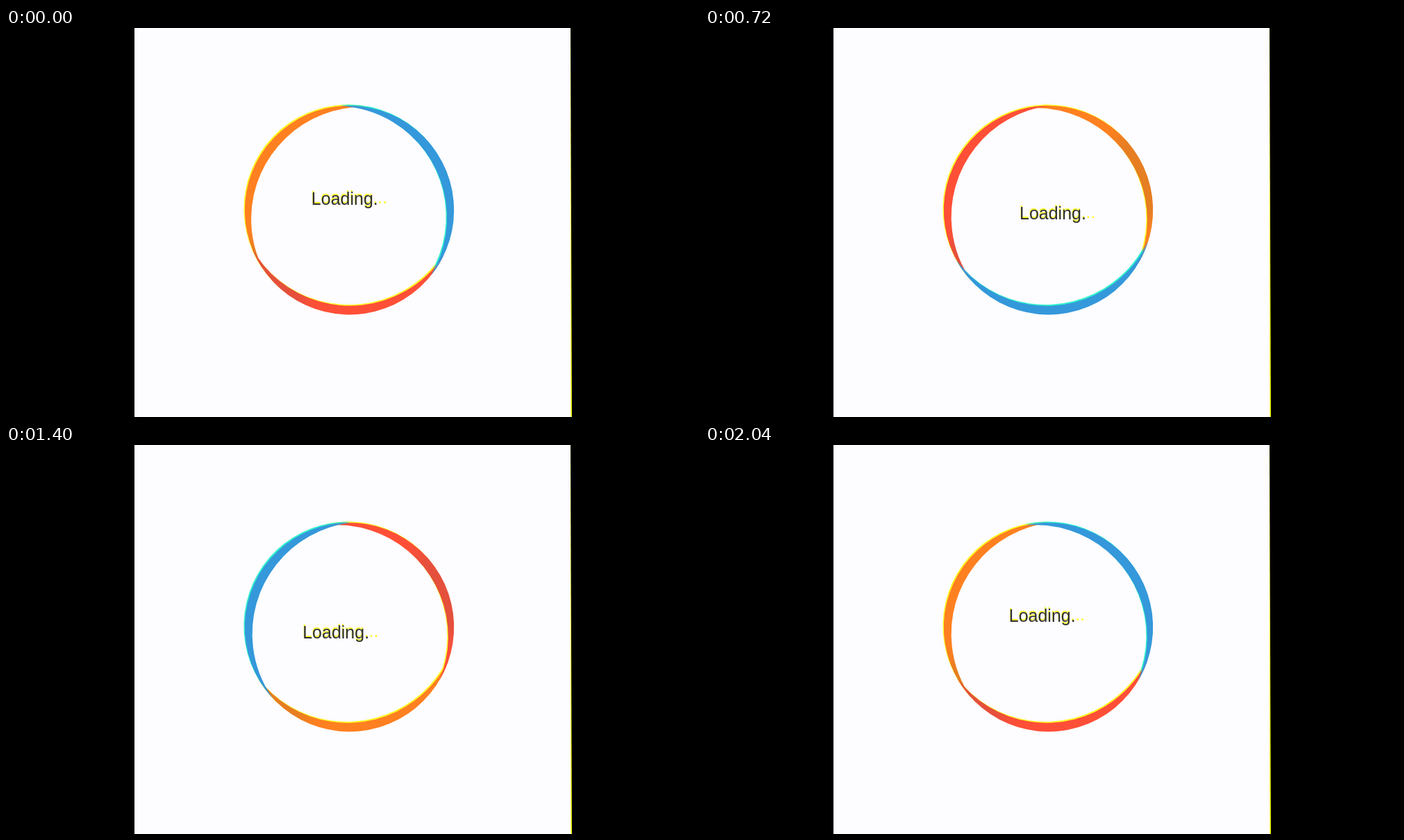
An HTML page with a canvas for the animation above (2.12 s loop, 998 px wide and 561 px high).

```html
<!DOCTYPE html>
<html>
<head>
<meta charset="utf-8">
<style>
html, body { margin: 0; width: 100%; height: 100%; overflow: hidden; background: #000; }
canvas { display: block; }
</style>
</head>
<body>
<canvas id="stage" width="998" height="561"></canvas>
<script>
const c = document.getElementById('stage').getContext('2d');
const CX = 494.5, CY = 262.7, R = 150.7;   // ring
const IN_R = 161.4, SHIFT = 23.6;          // inner edge of a crescent: larger circle, moved back
const RAD = Math.PI / 180;
const PAPER = '#fdfcfe', YELLOW = '#ffff28';

// Half angles at which the outer and inner circles meet
const meetX = (IN_R ** 2 - R ** 2 - SHIFT ** 2) / (2 * SHIFT);
const outerHalf = Math.acos(meetX / R);
const innerHalf = Math.acos((meetX + SHIFT) / IN_R);

// Warm colours are duller at the right and at the lower left of the ring
function shaded(bright, dull) {
  const g = c.createConicGradient(-Math.PI / 2, CX, CY);
  [[0, bright], [.1, bright], [.14, dull], [.25, dull], [.29, bright],
   [.55, bright], [.59, dull], [.68, dull], [.72, bright], [1, bright]]
    .forEach(([at, color]) => g.addColorStop(at, color));
  return g;
}

const parts = [
  { fill: shaded('#ff8020', '#e67e22'), fringe: YELLOW, at: 300 },
  { fill: shaded('#ff4f37', '#e5503c'), fringe: YELLOW, at: 180 },
  { fill: '#3498db', fringe: '#30f2cc', at: 60 }
];

function poly(color, ...points) {
  c.fillStyle = color;
  c.beginPath();
  points.forEach(p => c.lineTo(...p));
  c.fill();
}

function crescent(color, deg, dx, dy) {
  const a = (deg - 90) * RAD, x = CX + dx, y = CY + dy;
  c.fillStyle = color;
  c.beginPath();
  c.arc(x, y, R, a - outerHalf, a + outerHalf);
  c.arc(x - SHIFT * Math.cos(a), y - SHIFT * Math.sin(a), IN_R, a + innerHalf, a - innerHalf, true);
  c.fill();
}

function label(text, color, x, y) {
  c.fillStyle = color;
  c.fillText(text, x, y);
}

// 15 steps a second on a 40 ms grid, after a longer first hold
function stepAt(t) {
  if (t < 120) return 0;
  const u = t - 120, r = u % 200;
  return 1 + 3 * Math.floor(u / 200) + (r >= 80) + (r >= 120);
}

function draw(now) {
  const k = stepAt(now % 2120);
  const turn = k ? 12 * k - 6 : 2;

  c.fillStyle = '#000';
  c.fillRect(0, 0, 998, 561);
  poly('#f0f000', [800, 0], [813, 0], [815, 561], [800, 561]);
  poly(PAPER, [185, 0], [812.8, 0], [813.4, 561], [185, 561]);

  for (const p of parts) crescent(p.fringe, p.at + turn, -1.4, -1.6);
  for (const p of parts) crescent(p.fill, p.at + turn, 0, 0);

  const x = 439.3 + 15 * Math.sin(turn * RAD);
  const y = 270 - 15 * Math.cos(turn * RAD);
  c.font = '25px "Liberation Sans", Arial, sans-serif';
  label('Loading...', YELLOW, x - .5, y - 1.8);
  label('Loading.', '#303034', x, y);
  requestAnimationFrame(draw);
}
draw(performance.now());
</script>
</body>
</html>
```
